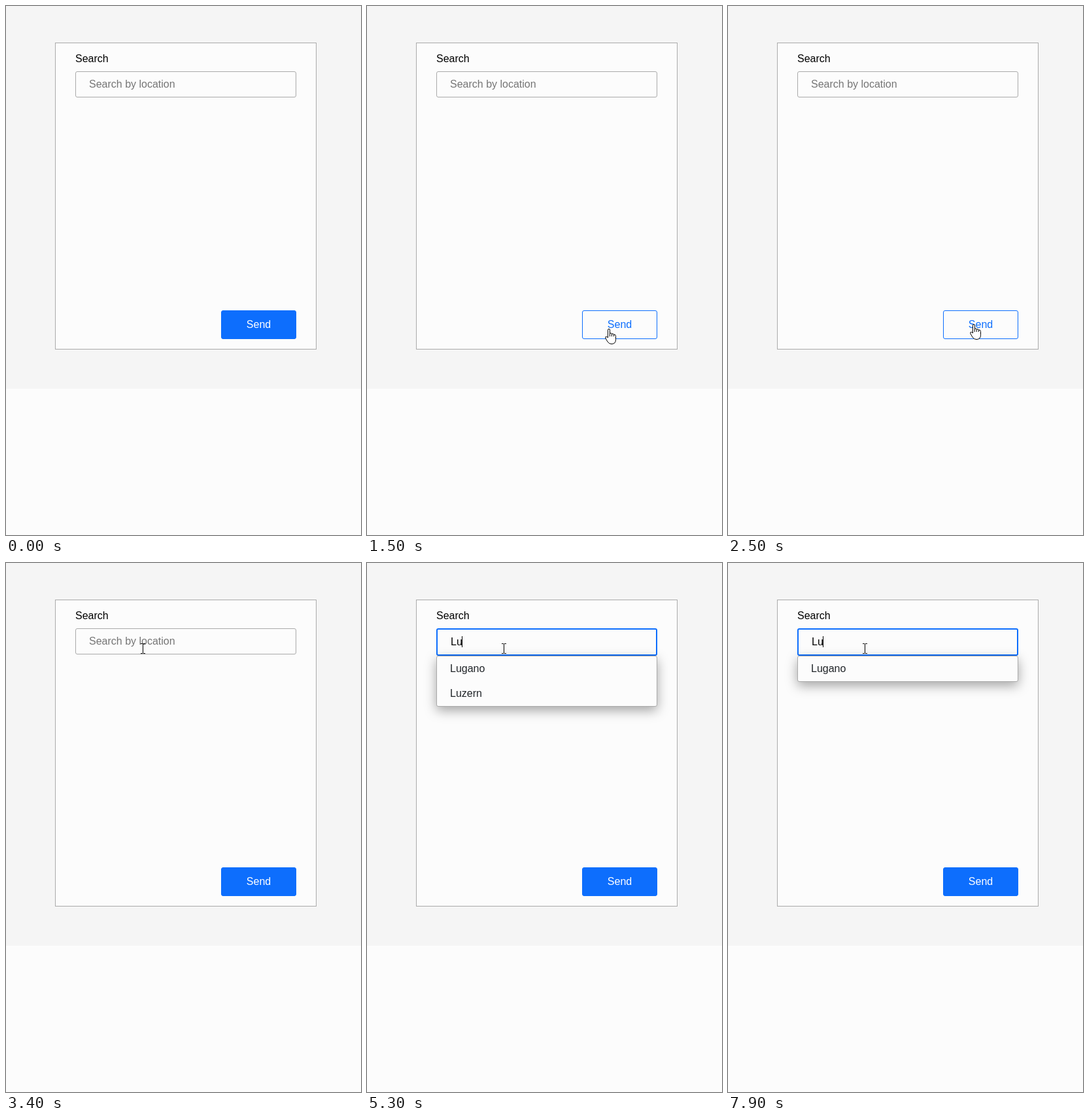
Animation of 543 by 810 pixels, one loop 8 s. Source, as an HTML page:

```html
<!DOCTYPE html>
<html lang="en">
<head>
<meta charset="utf-8">
<title>Location search</title>
<style>
  * { box-sizing: border-box; }
  html, body { margin: 0; width: 100%; height: 100%; overflow: hidden; background: #fcfcfc; }
  body { position: relative; font: 16px/18px "Liberation Sans", Arial, sans-serif; color: #000; }
  body > *, .bar, .bar * { position: absolute; }
  .top { left: 0; top: 0; width: 543px; height: 586px; background: #f5f5f5; }
  .card { left: 75px; top: 56px; width: 400px; height: 470px; background: #fcfcfc; border: 1px solid #aaa; }
  .label { left: 106px; top: 72px; }
  #field { left: 106px; top: 100px; width: 338px; border: 1px solid #aaa; border-radius: 3px;
    background: #fcfcfc; padding-left: 20px; line-height: 38px; white-space: pre; }
  #field.focus { border: 2px solid #0d6efd; }
  #field.empty { color: #757575; }
  #caret { top: 112px; width: 1px; height: 17px; background: #000; }
  #list { left: 106px; top: 142px; width: 338px; max-height: 300px; overflow: hidden; background: #fcfcfc;
    color: #212529; border: 1px solid #aaa; border-radius: 3px; box-shadow: 0 6px 18px rgba(0, 0, 0, .35); }
  #list p { margin: 0; padding-left: 20px; line-height: 38px; }
  .bar { right: 0; top: 0; width: 17px; height: 298px; background: #f1f1f1; }
  .thumb { left: 2px; top: 17px; width: 13px; background: #c1c1c1; }
  .bar svg { left: 0; top: 0; }
  #send { left: 329px; top: 466px; width: 115px; height: 44px; border: 1px solid #0d6efd; border-radius: 3px;
    background: #0d6efd; color: #fff; text-align: center; line-height: 42px; }
  #send.hover { background: #fcfcfc; color: #0d6efd; }
  #pointer { left: 0; top: 0; overflow: visible; }
  #pointer path { fill: #fff; stroke: #000; }
</style>
</head>
<body>
<div class="top"></div>
<div class="card"></div>
<div class="label">Search</div>
<div id="field"></div>
<div id="caret"></div>
<div id="send">Send</div>
<div id="list"></div>
<svg id="pointer" width="1" height="1"><path/></svg>
<script>
const LOOP = 8000, STEP = 100, BLINK = 500, CLICK = 3500;
const ROW = 38, VIEW = 298, ARROW = 17;
const cities = ["Lugano", "Milan", "Roma", "Locarno", "Napoli", "Mendrisio", "Bellinzona",
  "Como", "Luzern", "Istanbul", "Berlin", "Zurigo", "Genova"];

const linear = u => u;
const easeOut = u => 1 - (1 - u) ** 2.5;
const easeInOut = u => u * u * (3 - 2 * u);

// Each move follows a quadratic curve: from, control point, to
const moves = [
  { start: 300, end: 1100, path: [[531, 36], [10, 20], [283, 319]], ease: linear },
  { start: 1100, end: 1600, path: [[283, 319], [333, 410], [371, 497]], ease: easeOut },
  { start: 1700, end: 2500, path: [[371, 497], [377, 331], [376, 487]], ease: linear },
  { start: 2600, end: 3400, path: [[376, 487], [270, 325], [209, 131]], ease: easeInOut }
];
const inputs = [
  { at: CLICK, text: "" },
  { at: 4900, text: "L" },
  { at: 5200, text: "Lu" },
  { at: 5900, text: "Lug" },
  { at: 6700, text: "Luga" },
  { at: 7600, text: "Lug" },
  { at: 7900, text: "Lu" }
];

const shapes = {
  arrow: "M.5 .5V16.5L4.2 13l2.4 5.5 2.3-1L6.5 12h5z",
  hand: "M-1.5 14V2.2Q-1.5 .5 0 .5T1.5 2.2V7.2Q4 6.3 4.5 8Q7 7.2 7.5 9Q10.5 8.5 10.5 11.5V16.5" +
    "Q10.5 23.5 4 23.5Q0 23.5-2 20L-5 15Q-6 12-3.5 12ZM1.5 7V12M4.5 8V12M7.5 9V12",
  beam: "M-3-7.5H0M1-7.5H4M.5-7V7M-3 7.5H0M1 7.5H4"
};

const $ = id => document.getElementById(id);
const field = $("field"), caret = $("caret"), list = $("list"), send = $("send"), pointer = $("pointer");
const inside = ([x, y], l, t, r, b) => x >= l && x < r && y >= t && y < b;
const inputAt = t => inputs.findLast(i => i.at <= t) || inputs[0];

function spotAt(t) {
  const move = moves.findLast(m => m.start <= t);
  if (!move) return null;
  const { start, end, path: [a, b, c], ease } = move;
  const u = ease(Math.min(1, (t - start) / (end - start))), v = 1 - u;
  return [0, 1].map(i => Math.round(v * v * a[i] + 2 * u * v * b[i] + u * u * c[i]));
}

function listHtml(query) {
  const rows = cities.filter(c => c.toLowerCase().includes(query.toLowerCase()));
  const total = rows.length * ROW;
  let html = rows.map(c => `<p>${c}</p>`).join("");
  if (total > VIEW) {
    const thumb = Math.round((VIEW - 2 * ARROW) * VIEW / total);
    html += `<div class="bar"><div class="thumb" style="height:${thumb}px"></div>
      <svg width="17" height="298"><path d="M4.5 11h8l-4-4z" fill="#a3a3a3"/>
      <path d="M4.5 287h8l-4 4z" fill="#505050"/></svg></div>`;
  }
  return html;
}

function drawPointer(spot) {
  pointer.style.display = spot ? "" : "none";
  const onSend = !!spot && inside(spot, 329, 466, 444, 510);
  send.className = onSend ? "hover" : "";
  if (!spot) return;
  const kind = onSend ? "hand" : inside(spot, 106, 100, 444, 140) ? "beam" : "arrow";
  pointer.style.transform = `translate(${spot[0]}px, ${spot[1]}px)`;
  pointer.firstChild.setAttribute("d", shapes[kind]);
}

let lastQuery;
function draw(t) {
  const focused = t >= CLICK + STEP, { at, text } = inputAt(t);
  field.className = (focused ? "focus" : "") + (text ? "" : " empty");
  field.textContent = text || "Search by location";

  // Every input restarts the blinking
  const lit = Math.floor((t - at) / BLINK) % 2 === 0;
  caret.style.display = focused && lit ? "" : "none";
  caret.style.left = Math.floor(128 + 8.898 * text.length) + "px";

  // The list follows the text one step later
  const query = inputAt(t - STEP).text;
  list.style.display = focused ? "" : "none";
  if (query !== lastQuery) list.innerHTML = listHtml(lastQuery = query);

  drawPointer(spotAt(t));
}

const begin = performance.now();
function tick() {
  const t = (performance.now() - begin) % LOOP;
  draw(Math.floor(t / STEP) * STEP);
  requestAnimationFrame(tick);
}
tick();
</script>
</body>
</html>
```
